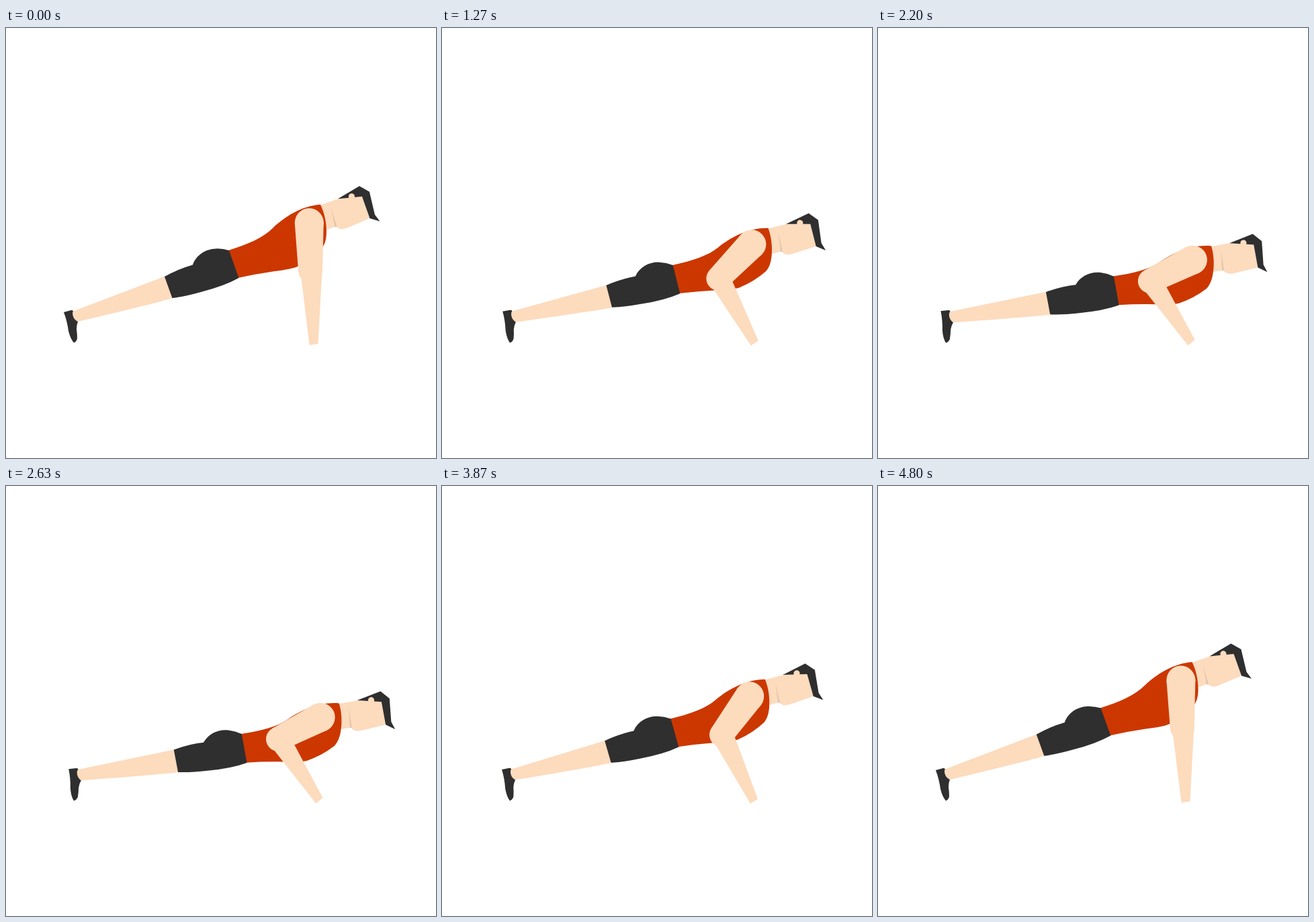
Animation, 640 px wide and 640 px high, one loop 4.83 s. Source, as an HTML page:

```html
<!DOCTYPE html>
<html lang="en">
<head>
<meta charset="utf-8">
<title>Push-up</title>
<style>
  html, body { margin: 0; height: 100%; overflow: hidden; background: #fff; }
  svg { display: block; width: 100vw; height: 100vh; }
  .skin { fill: #fddbbd; }
  .dark { fill: #2f2f2f; }
  .shirt { fill: #cc3700; }
  .shade { fill: #e5c6aa; }
</style>
</head>
<body>
<svg viewBox="0 0 640 640">
  <g id="body">
    <path class="dark" d="M86 423L97 420Q100 419.500 100 422L107 437Q105 442 105 448Q106 455 106 462Q105 467 101 468.500Q96 463 93 451Q91 436 86 423Z"/>
    <path class="skin" d="M100 421.500L237 369.500L248 402Q225 409 107 437Q99 433 99 424Z"/>
    <path class="skin" d="M467 264L496 254L530 251L541.500 283.500L507 298Q496 302 491.500 295.500L476 301Z"/>
    <path class="shade" d="M484 268L492.500 296L489.500 296.500Z"/>
    <path class="dark" d="M494 254.500L526 235.500L541 244L549 278L556.500 288L541.500 283.500L530 251Z"/>
    <circle class="skin" cx="514.500" cy="251" r="4.600"/>
    <path class="shirt" d="M331 331C360 322 383 312 397 298C415 281 440 265 468 263C474 275 477 290 477 303C477 314 475 321 471 327Q455 344 434 355Q425 359 400 362Q372 366 345 372Z"/>
    <path class="dark" d="M236 370Q258 358 278 352.500C283 338 297 329 312 328.500Q322 328 332 331L346.500 372Q325 384 290 393Q265 400 247.500 402Z"/>
  </g>
  <path id="forearm" class="skin" d="M0 15L111 6.500L109.600 -6.500L0 -17.500Z"/>
  <g id="upperArm" class="skin">
    <path d="M8 20.100L79 18V-18L8 -22.900Z"/>
    <circle cx="8" cy="-1.400" r="21.500"/>
    <circle cx="79" r="18"/>
  </g>
</svg>
<script>
const LOOP = 4830, LEAD = 30, DOWN = 2430;
const UPPER = 79, LOWER = 93.84;
const toe = { x: 101, y: 468 };
const wrist = { x: 457.3, y: 454.6 };
const shoulderOffset = { x: 348.6, y: -186 };
const [bodyEl, upperEl, lowerEl] =
  ["body", "upperArm", "forearm"].map(id => document.getElementById(id));

const along = (p, angle, length) =>
  ({ x: p.x + length * Math.cos(angle), y: p.y + length * Math.sin(angle) });
const angleTo = (a, b) => Math.atan2(b.y - a.y, b.x - a.x);
const place = (el, p, angle) =>
  el.setAttribute("transform", `translate(${p.x} ${p.y}) rotate(${angle * 180 / Math.PI})`);

function draw(time) {
  const u = (time + LEAD) % LOOP;
  const depth = u < DOWN ? u / DOWN : (LOOP - u) / (LOOP - DOWN);
  const tilt = -0.15 + 10.2 * depth;
  bodyEl.setAttribute("transform", `rotate(${tilt} ${toe.x} ${toe.y})`);

  // The body pivots on the toe; the arm is a two-bone chain to a fixed wrist.
  const { x, y } = shoulderOffset;
  const shoulder = along(toe, Math.atan2(y, x) + tilt * Math.PI / 180, Math.hypot(x, y));
  const reach = Math.hypot(wrist.x - shoulder.x, wrist.y - shoulder.y);
  const cosine = (UPPER ** 2 + reach ** 2 - LOWER ** 2) / (2 * UPPER * reach);
  const upperAngle = angleTo(shoulder, wrist) +
    (reach < UPPER + LOWER ? Math.acos(cosine) : 0);
  const elbow = along(shoulder, upperAngle, UPPER);
  place(upperEl, shoulder, upperAngle);
  place(lowerEl, elbow, angleTo(elbow, wrist));
}

function tick() {
  draw(performance.now() % LOOP);
  requestAnimationFrame(tick);
}
tick();
</script>
</body>
</html>
```
